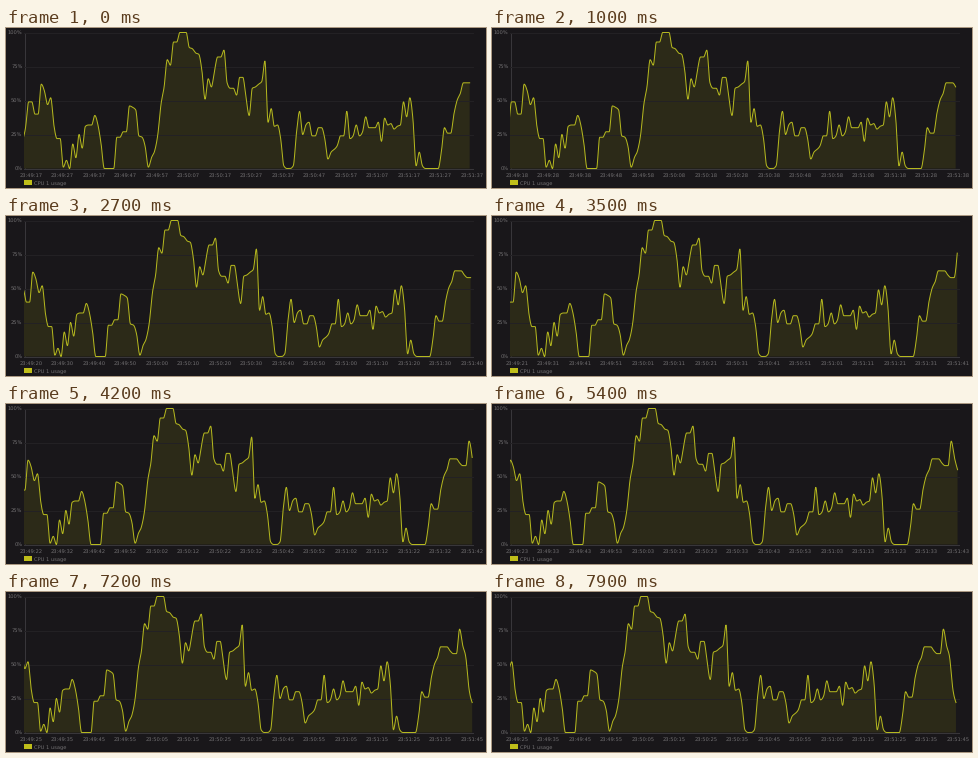
Recreate the animation shown at these times as a matplotlib script. Size 480 by 160 pixels, loop 8000 ms.

```python
import matplotlib.pyplot as plt
import numpy as np
from matplotlib.animation import FuncAnimation
from matplotlib.patches import Polygon, Rectangle

W, H, DPI = 480, 160, 80
PX = 72 / DPI
LEFT, RIGHT, TOP, BASE = 18, 466.5, 4.5, 140.5
STEP = 3.15          # pixels per second
FRAMES, INTERVAL = 80, 100
WINDOW = 142         # seconds visible behind the newest sample
START = (23 * 60 + 49) * 60 + 17

BG, GRID, AXIS = "#19171a", "#232124", "#38363a"
TEXT, LINE, FILL = "#727072", "#b5b81f", "#2c2a18"

# CPU load in percent, one sample per second
load = np.array([
    20, 30, 49, 49, 40, 40, 62, 57, 47, 52, 32, 22, 22, 1, 6, 0,
    18, 8, 25, 15, 31, 32, 32, 39, 32, 18, *[0] * 4, 23, 23, 27, 27,
    46, 45, 43, 24, 23, 16, 1, 8, 13, 25, 47, 60, 80, 76, 93, 93,
    *[100] * 3, 89, 88, 85, 84, 72, 51, 66, 60, 72, 82, 82, 87, 63,
    59, 59, 54, 67, 67, 52, 39, 59, 60, 62, 64, 79, 34, 44, 31, 32,
    22, 2, 0, 0, 2, 26, 42, 25, 32, 34, 24, 24, 30, 30, 22, 7, 12, 14,
    17, 24, 24, 42, 22, 24, 32, 24, 27, 38, *[30] * 3, 34, 20, 37, 32,
    33, 29, 31, 32, 49, 38, 52, 36, 2, 12, 2, *[0] * 5, 12, 30, 26, 26,
    40, 50, 55, *[63] * 3, 60, 58, 58, 76, 64, 55, 32, 22], float)


def monotone(v, n=10):
    """Sample a monotone cubic through evenly spaced values."""
    s = np.diff(v)
    a, b = s[:-1], s[1:]
    low = np.minimum(np.minimum(abs(a), abs(b)), abs(a + b) / 4)
    m = np.zeros(len(v))
    m[1:-1] = (np.sign(a) + np.sign(b)) * low
    m[0] = (3 * s[0] - m[1]) / 2
    m[-1] = (3 * s[-1] - m[-2]) / 2
    u = np.linspace(0, 1, n, endpoint=False)
    p, q, d, e = (k[:, None] for k in (v[:-1], v[1:], m[:-1], m[1:]))
    y = (p * (1 + 2 * u) * (1 - u) ** 2 + q * u * u * (3 - 2 * u)
         + d * u * (1 - u) ** 2 + e * u * u * (u - 1))
    x = np.arange(len(v) - 1)[:, None] + u
    return np.append(x, len(v) - 1), np.append(y, v[-1])


def to_y(percent):
    return BASE - percent * (BASE - TOP) / 100


def clock(sec):
    return f"{sec // 3600:02d}:{sec // 60 % 60:02d}:{sec % 60:02d}"


plt.rcParams.update({"font.family": "DejaVu Sans", "text.hinting": "none"})
fig = plt.figure(figsize=(W / DPI, H / DPI), dpi=DPI, facecolor=BG)
ax = fig.add_axes([0, 0, 1, 1])
ax.set(xlim=(0, W), ylim=(H, 0))
ax.axis("off")


def label(x, y, s, ha):
    return ax.text(x, y, s, ha=ha, va="baseline", color=TEXT,
                   fontsize=5.1 * PX)


for pct in (0, 25, 50, 75, 100):
    y = to_y(pct)
    ax.plot([LEFT, RIGHT], [y, y], color=GRID if pct else AXIS,
            lw=PX, zorder=3 if pct else 1)
    label(16.5, y + 1.9, f"{pct}%", "right")
ax.plot([LEFT + 0.5] * 2, [TOP, BASE], color=AXIS, lw=PX, zorder=1)

ax.add_patch(Rectangle((18, 152), 8, 5, fc="#bfbe1a", lw=0))
label(28, 156.7, "CPU 1 usage", "left")
times = [label(24.7 + 10 * STEP * i, 148.6, "", "center") for i in range(15)]

area = Polygon([(0, 0)] * 3, fc=FILL, lw=0, zorder=2)
ax.add_patch(area)
line, = ax.plot([], [], color=LINE, lw=PX, zorder=4)
clip = Rectangle((LEFT, 0), W - LEFT, H, transform=ax.transData)
for art in (area, line):
    art.set_clip_path(clip)


def draw(i):
    tick, part = divmod(i + 9, 10)
    newest = WINDOW + tick
    x, v = monotone(load[:newest + 1])
    x = RIGHT + STEP * (x - newest - part / 10)
    y = to_y(v)
    line.set_data(x, y)
    area.set_xy(np.column_stack([np.r_[x, x[-1], x[0]],
                                 np.r_[y, BASE, BASE]]))
    for n, t in enumerate(times):
        t.set_text(clock(START + tick + 10 * n))
    return [line, area, *times]


anim = FuncAnimation(fig, draw, frames=FRAMES, interval=INTERVAL,
                     repeat=True, repeat_delay=0)
plt.show()
```
